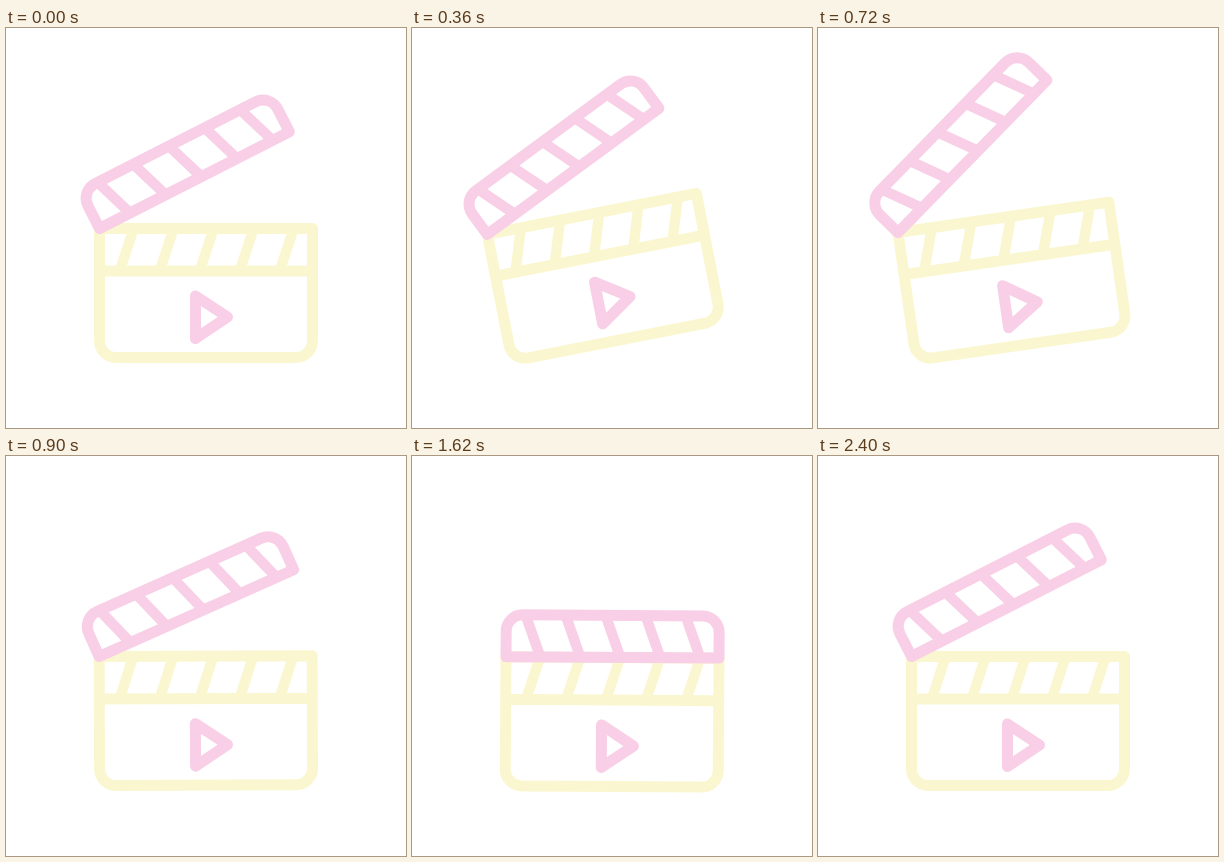
Recreate the animation shown at these times as an HTML page. Size 400 px wide and 400 px high, loop 4460 ms.

```html
<!DOCTYPE html>
<html lang="en">
<head>
<meta charset="utf-8">
<title>Clapperboard</title>
<style>
  html, body { margin: 0; width: 100%; height: 100%; overflow: hidden; background: #fff; }
  svg { display: block; width: 100%; height: 100%; }
  path { fill: none; stroke-width: 11; stroke-linejoin: round; }
  .slats { stroke-width: 10.4; }
  .yellow { stroke: #faf7d0; }
  .pink { stroke: #f8cfe6; }
</style>
</head>
<body>
<svg viewBox="0 0 400 400">
  <g id="board">
    <path class="yellow slats" id="lowSlats"/>
    <path class="yellow" d="M93.5 200.5H306.5V313A16.5 16.5 0 0 1 290 329.5H110A16.5 16.5 0 0 1 93.5 313ZM93.5 243H306.5"/>
    <path class="pink" d="M189.5 268V310.5L221.5 289Z"/>
    <g id="arm">
      <path class="pink slats" id="topSlats"/>
      <path class="pink" d="M93.5 200.5V175A16.5 16.5 0 0 1 110 158.5H290A16.5 16.5 0 0 1 306.5 175V200.5Z"/>
    </g>
  </g>
</svg>
<script>
const LOOP = 4460, TICK = 30;
const $ = id => document.getElementById(id);

const sine = p => (1 - Math.cos(Math.PI * p)) / 2;
const quadIn = p => p * p;
const quadOut = p => p * (2 - p);

// Each step: time in ms, angle in degrees, easing towards that angle
const boardSteps = [
  [0, 0], [120, 4.15, sine], [420, -12.7, sine], [570, -13, sine], [930, 0, sine],
  [1590, 0, sine], [1740, 4.15, sine], [2130, 0, sine], [LOOP, 0, sine]
];
const armSteps = [
  [0, -27], [150, -20, sine], [570, -41, quadIn], [1080, 0, quadIn],
  [1200, -1.9, quadOut], [1320, 0, quadIn], [1590, 0, sine], [1900, -1.5, sine],
  [2095, -36.5, sine], [2400, -27, sine], [LOOP, -27, sine]
];

function valueAt(steps, t) {
  const i = steps.findIndex(s => s[0] > t);
  const [t0, v0] = steps[i - 1], [t1, v1, ease] = steps[i];
  return v0 + (v1 - v0) * ease((t - t0) / (t1 - t0));
}

function slats(x0, y0, x1, y1) {
  return [0, 40, 80, 120, 160]
    .map(dx => `M${x0 + dx} ${y0}L${x1 + dx} ${y1}`).join('');
}

$('lowSlats').setAttribute('d', slats(127.6, 200.5, 113.8, 243));
$('topSlats').setAttribute('d', slats(112.8, 158.5, 127.8, 200.5));

function draw(ms) {
  const t = Math.floor((ms % LOOP) / TICK) * TICK;
  const tilt = valueAt(boardSteps, t);
  // The board leans back and tips forward around different points
  const pivot = tilt > 0 ? '55 275' : '115 297';
  $('board').setAttribute('transform', `rotate(${tilt} ${pivot})`);
  $('arm').setAttribute('transform', `rotate(${valueAt(armSteps, t)} 93.5 200.5)`);
}

const start = performance.now();
function frame() {
  draw(performance.now() - start);
  requestAnimationFrame(frame);
}
frame();
</script>
</body>
</html>
```
